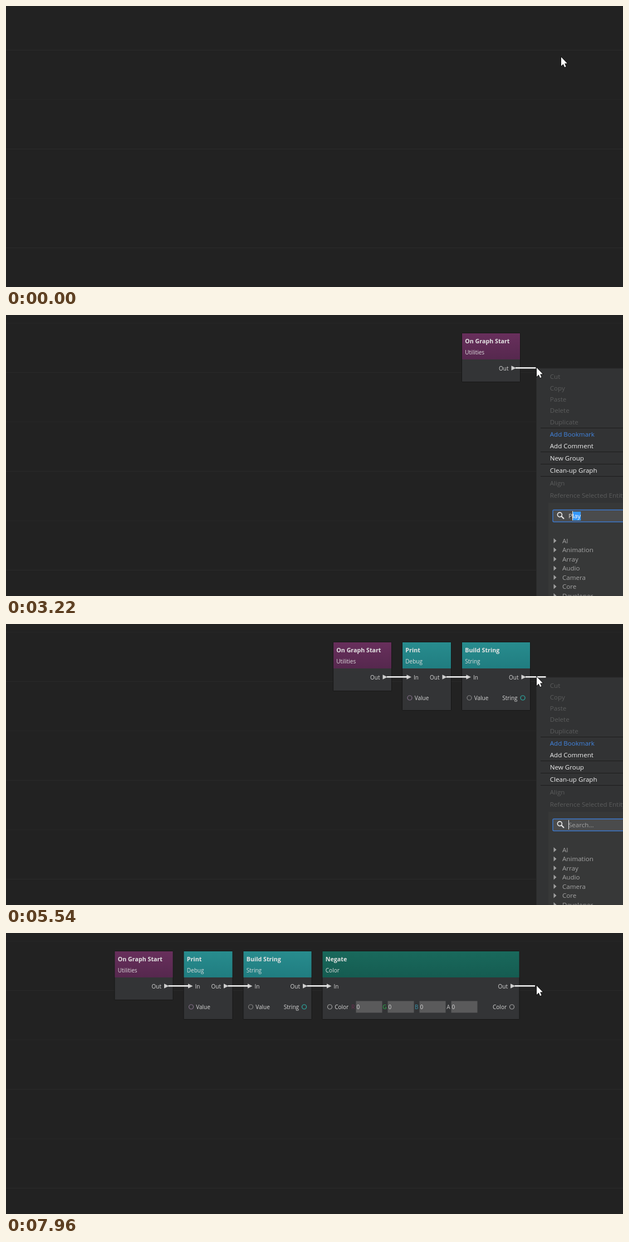
Write an HTML page with a canvas that moves like this. It is 1108 by 506 pixels and loops after 8 s.

```html
<!DOCTYPE html>
<html lang="en">
<head>
<meta charset="utf-8">
<title>Building a node graph</title>
<style>
  html, body { margin: 0; width: 100%; height: 100%; overflow: hidden; background: #222; }
  canvas { display: block; }
</style>
</head>
<body>
<canvas id="stage" width="1108" height="506"></canvas>
<script>
const ctx = document.getElementById('stage').getContext('2d');
const LOOP = 8000;
const SANS = '"Open Sans", sans-serif';
const SMALL = '10px ' + SANS, TITLE = 'bold 10.7px ' + SANS, MENU = '11.6px ' + SANS;

// x is relative to the first node; scroll runs from "move" for "dur" ms.
const nodes = [
  { title: 'On Graph Start', group: 'Utilities', x: 0, w: 104, h: 87, top: '#682f5c', bottom: '#56284e', born: 2590, move: 2760, dur: 240, shift: 128 },
  { title: 'Print', group: 'Debug', x: 124, w: 87, h: 122, top: '#288c8e', bottom: '#207d80', born: 3950, move: 4010, dur: 190, shift: 107,
    input: 'Value', inputColor: '#85708a' },
  { title: 'Build String', group: 'String', x: 231, w: 122, h: 122, top: '#288c8e', bottom: '#207d80', born: 5320, move: 5400, dur: 190, shift: 143,
    input: 'Value', inputColor: '#858585', output: 'String', outputColor: '#2bb0a8' },
  { title: 'Negate', group: 'Color', x: 373, w: 353, h: 122, top: '#19695c', bottom: '#155c51', born: 6470, move: 6540, dur: 200, shift: 373.5,
    input: 'Color', inputColor: '#a5a5a5', output: 'Color', outputColor: '#a5a5a5', fields: true }
];

const menus = [
  { open: 860, close: 2520, keys: [1820, 2000, 2090, 2190, 2280, 2370], words: ['Or', 'On Graph Start'] , typed: 'On Gra' },
  { open: 2800, close: 3910, keys: [3220, 3450, 3520, 3600, 3680], words: ['Play', 'Project World Point', 'Print'], typed: 'Print' },
  { open: 3980, close: 5260, keys: [4420, 4490, 4560, 4630, 4700], words: ['Boolean', 'Build String'], typed: 'Build', filterAt: 4980 },
  { open: 5370, close: 6330, keys: [5820, 5880, 5940, 6000, 6060, 6120], words: ['Nand', 'Negate'], typed: 'Negate' },
  { open: 6500, close: 7640, keys: [], words: [], typed: '' }
];

// label, centre y, colour
const OFF = '#5b5c5c', ON = '#f0f0f0';
const actions = [
  ['Cut', 111, OFF], ['Copy', 131.5, OFF], ['Paste', 152, OFF], ['Delete', 172, OFF], ['Duplicate', 192.5, OFF],
  ['Add Bookmark', 215, '#4285e0'], ['Add Comment', 235.5, ON], ['New Group', 258, ON], ['Clean-up Graph', 280, ON],
  ['Align', 302.5, OFF], ['Reference Selected Entity', 325, OFF]
];
const categories = ['AI', 'Animation', 'Array', 'Audio', 'Camera', 'Core', 'Developer'];
const matches = [
  { level: 0, text: 'Math' }, { level: 1, text: 'Vector3' },
  { before: '', hit: 'Build', after: ' Tangent Basis', icon: '#14a39a' },
  { level: 0, text: 'Other' }, { level: 1, text: 'RiverRequestBus' },
  { before: 'Re', hit: 'build', after: '', icon: '#1249b4' },
  { level: 1, text: 'RoadRequestBus' }
];

const clamp = v => Math.max(0, Math.min(1, v));
const span = (t, from, dur) => clamp((t - from) / dur);
const easeOut = p => 1 - (1 - p) * (1 - p);
const easeInOut = p => p < .5 ? 2 * p * p : 1 - 2 * (1 - p) * (1 - p);

function rect(x, y, w, h, color) {
  ctx.fillStyle = color;
  ctx.fillRect(x, y, w, h);
}

function text(s, x, y, font, color, align = 'left') {
  ctx.font = font;
  ctx.textAlign = align;
  ctx.fillStyle = color;
  ctx.fillText(s, x, y);
}

function width(s, font) {
  ctx.font = font;
  return ctx.measureText(s).width;
}

function path(points, fill, stroke, lineWidth = 1) {
  ctx.beginPath();
  points.forEach(([x, y]) => ctx.lineTo(x, y));
  ctx.closePath();
  if (stroke) { ctx.strokeStyle = stroke; ctx.lineWidth = lineWidth; ctx.stroke(); }
  if (fill) { ctx.fillStyle = fill; ctx.fill(); }
}

function ring(x, y, color, r = 4, lineWidth = 1.2) {
  ctx.beginPath();
  ctx.arc(x, y, r, 0, 7);
  ctx.strokeStyle = color;
  ctx.lineWidth = lineWidth;
  ctx.stroke();
}

function arrow(x, y, filled) {
  const points = [[x, y - 4.2], [x + 8.5, y], [x, y + 4.2]];
  filled ? path(points, '#cfcfcf') : path(points, null, '#cfcfcf');
}

const wire = (from, to, y) => rect(from, y - 1.5, to - from, 2.6, '#eeeeee');

function drawGrid(lift) {
  const strong = lift > 32 ? 1 : 0;
  for (let i = 0; i < 6; i++) {
    rect(0, Math.round(79 + i * 89 - lift), 1108, 1, i % 2 === strong ? '#2a2a2a' : '#262626');
  }
}

function drawNode(n, i, ox, oy, wired) {
  const x = ox + n.x, right = x + n.w, portY = oy + 62.5, dataY = oy + 100;
  const ink = '#d6d6d6';
  ctx.beginPath();
  ctx.roundRect(x - 1, oy - 1, n.w + 2, n.h + 2, 2);
  ctx.fillStyle = '#171717';
  ctx.fill();
  rect(x, oy, n.w, n.h, '#333436');
  const shade = ctx.createLinearGradient(0, oy, 0, oy + 47);
  shade.addColorStop(0, n.top);
  shade.addColorStop(1, n.bottom);
  rect(x, oy, n.w, 47, shade);
  text(n.title, x + 5.3, oy + 17.5, TITLE, '#e4e4e4');
  text(n.group, x + 5.3, oy + 37.5, SMALL, '#dedede');

  text('Out', right - 20.5, portY + 4, SMALL, ink, 'right');
  arrow(right - 15.5, portY, wired);
  if (i) {
    text('In', x + 20, portY + 4, SMALL, ink);
    arrow(x + 7.5, portY, true);
  }
  if (n.input) {
    ring(x + 13, dataY, n.inputColor);
    text(n.input, x + 21.7, dataY + 4, SMALL, ink);
  }
  if (n.output) {
    ring(right - 13, dataY, n.outputColor);
    text(n.output, right - 22.5, dataY + 4, SMALL, ink, 'right');
  }
  if (n.fields) {
    ['#6e2f50', '#2fb04c', '#3a93a8', '#bdbdbd'].forEach((color, k) => {
      const fx = x + 60 + k * 57;
      text('RGBA'[k], fx - 2, dataY + 4, SMALL, color, 'right');
      rect(fx, oy + 89.5, 47, 21, '#5a5a5b');
      text('0', fx + 1, dataY + 4, SMALL, '#d8d8d8');
    });
  }
}

function drawSearch(menu, t) {
  ctx.beginPath();
  ctx.roundRect(982, 351, 140, 21.5, 2);
  ctx.fillStyle = '#4a4b4c';
  ctx.fill();
  ctx.strokeStyle = '#3c78cc';
  ctx.lineWidth = 1.4;
  ctx.stroke();
  ring(994.4, 359.6, '#e4e4e4', 4, 1.7);
  path([[997, 362], [1002, 367]], null, '#e4e4e4', 2.2);

  const count = menu.keys.filter(k => k <= t).length;
  const typed = menu.typed.slice(0, count);
  const caretX = 1010 + width(typed, MENU);
  if (count) {
    const rest = menu.words.find(w => w.startsWith(typed)).slice(count);
    text(typed, 1010, 366, MENU, '#d8d8d8');
    rect(caretX, 354, width(rest, MENU), 16, '#3497fb');
    text(rest, caretX, 366, MENU, '#ffffff');
  } else {
    text('Search...', 1010, 366, MENU, '#a2a2a2');
  }
  const since = t - (count ? menu.keys[count - 1] : menu.open);
  if (Math.floor(since / 530) % 2 === 0) rect(Math.round(caretX), 353, 1, 17, '#e6e6e6');
}

function drawTree(filtered) {
  const ink = '#a3a3a3';
  const rowY = i => 406.5 + i * 16.5;
  if (!filtered) {
    categories.forEach((name, i) => {
      const y = rowY(i);
      path([[983.5, y - 4.5], [988.5, y], [983.5, y + 4.5]], '#a0a0a0');
      text(name, 999, y + 4, MENU, ink);
    });
    return;
  }
  matches.forEach((m, i) => {
    const y = rowY(i);
    if (m.text) {
      const x = 981 + m.level * 19.5;
      path([[x, y - 2.5], [x + 10, y - 2.5], [x + 5, y + 2.5]], '#a0a0a0');
      text(m.text, x + 18, y + 4, MENU, ink);
      return;
    }
    const hitX = 1059 + width(m.before, MENU);
    const hitW = width(m.hit, MENU);
    rect(1041, y - 3.5, 10, 6.5, m.icon);
    rect(hitX, y - 7.5, hitW, 15, '#606161');
    text(m.before, 1059, y + 4, MENU, ink);
    text(m.hit, hitX, y + 4, MENU, ink);
    text(m.after, hitX + hitW, y + 4, MENU, ink);
  });
}

function drawMenu(menu, t) {
  ctx.globalAlpha = easeOut(span(t, menu.open, 130)) * (1 - span(t, menu.close, 70));
  rect(952, 95.5, 160, 420, '#2a2a2b');
  rect(953, 96.5, 160, 420, '#323334');
  rect(974, 338, 140, 170, '#373838');
  [203, 246, 268, 290].forEach(y => rect(960, y, 150, 1, '#1d1d1d'));
  actions.forEach(([label, y, color]) => text(label, 976.7, y + 4, MENU, color));
  drawSearch(menu, t);
  drawTree(t >= menu.filterAt);
  ctx.globalAlpha = 1;
}

function drawCursor(t) {
  const a = span(t, 10, 90), b = easeInOut(span(t, 620, 200));
  const x = 997 - 14 * a - 30 * b, y = 92 + 5 * a - 2 * b;
  const shape = [[0, 0], [0, 16], [3.7, 12.6], [6.2, 18.2], [8.6, 17.1], [6.1, 11.6], [10.8, 11.2]];
  path(shape.map(([px, py]) => [x + px, y + py]), '#ffffff', '#111111', 1.6);
}

function draw(t) {
  rect(0, 0, 1108, 506, '#222222');
  const lift = 65 * easeInOut(span(t, nodes[0].move, nodes[0].dur));
  const ox = nodes.reduce((x, n) => x - n.shift * easeInOut(span(t, n.move, n.dur)), 947);
  const oy = 98 - lift;
  const portY = oy + 62.5;
  const visible = nodes.filter(n => t >= n.born);
  const pulling = t >= nodes[0].move;

  drawGrid(lift);
  visible.forEach((n, i) => drawNode(n, i, ox, oy, pulling));
  visible.slice(1).forEach((n, i) => {
    wire(ox + nodes[i].x + nodes[i].w - 8, ox + n.x + 9, portY);
  });
  const menu = menus.find(m => t >= m.open && t < m.close + 70);
  if (menu) drawMenu(menu, t);
  if (pulling) {
    const last = visible[visible.length - 1];
    const end = ox + last.x + last.w;
    wire(end - 8, end + 28.5, portY);
  }
  drawCursor(t);
}

const start = performance.now();
function tick() {
  draw((performance.now() - start) % LOOP);
  requestAnimationFrame(tick);
}
tick();
</script>
</body>
</html>
```
